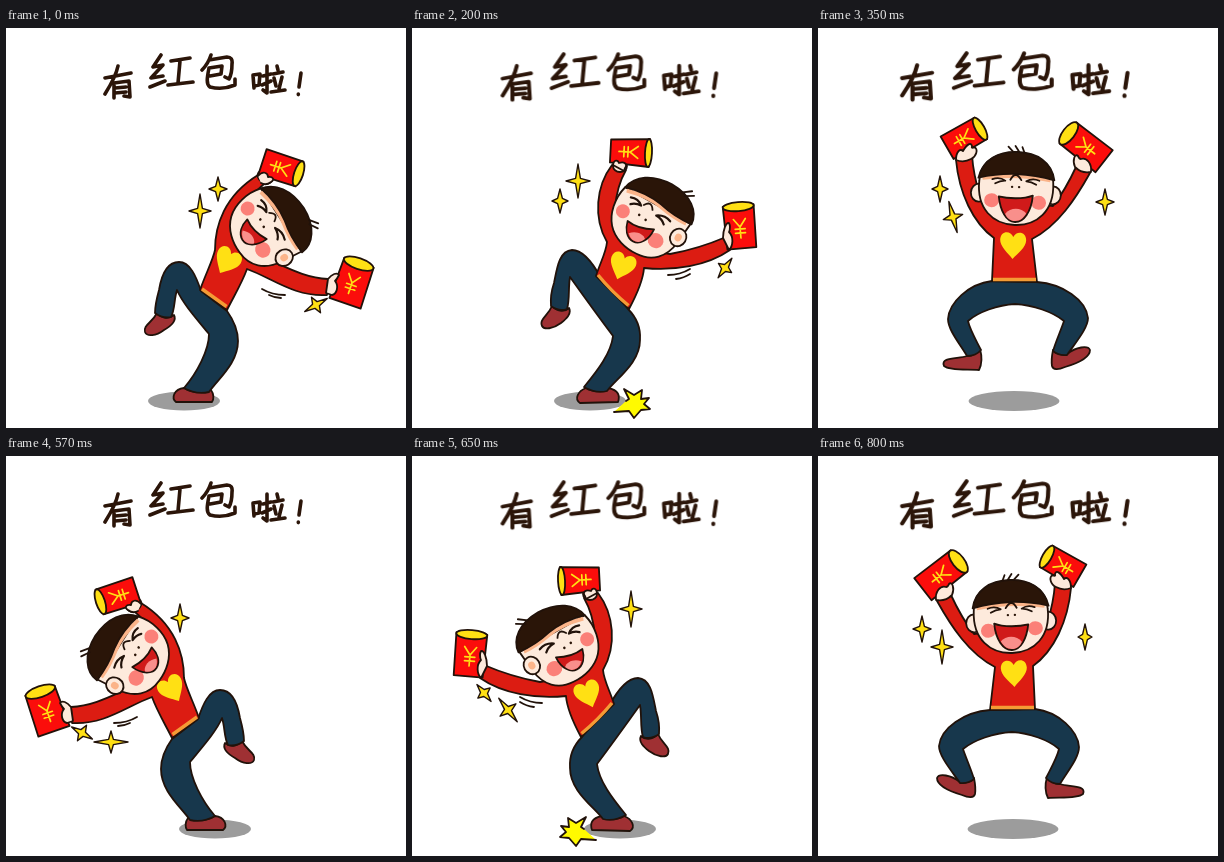
An HTML page that plays this animation: 400 px wide and 400 px high, repeating every 900 ms.

```html
<!DOCTYPE html>
<html lang="zh">
<head>
<meta charset="utf-8">
<title>有红包啦!</title>
<style>
  html, body { margin: 0; width: 100%; height: 100%; overflow: hidden; background: #fff; }
  svg { display: block; width: 100%; height: 100%; }
  .ink { stroke: #21120a; stroke-width: 1.8; stroke-linejoin: round; stroke-linecap: round; }
  .line { fill: none; }
  .eyes { fill: none; stroke-width: 2.2; }
  .pants { fill: #17374c; }
  .shoe { fill: #9f3033; }
  .shirt { fill: #dc1c12; }
  .skin { fill: #fdeadc; }
  .hair { fill: #2a1508; }
  .packet { fill: #fb0d0b; }
  .gold { fill: #ffe014; }
  .flash { fill: #fffa00; }
  .mouth { fill: #d01a1a; }
  .tongue { fill: #f98f8b; }
  .cheek { fill: #fb8078; }
  .blush { fill: none; stroke: #fbb489; stroke-width: 4; }
  .hem { stroke: #f49b35; stroke-width: 3.4; }
  .yen { fill: none; stroke: #ffe014; stroke-width: 1.7; stroke-linecap: round; }
  .star { stroke-width: 1.4; }
  .shadow { fill: #9c9c9c; }
  .words { fill: none; stroke: #2b1509; stroke-width: 3.6; stroke-linecap: round; stroke-linejoin: round;
    transform-origin: 198px 48px; animation: grow 450ms step-end infinite; }
  .lean, .kick, .jump { animation: lean 450ms step-end infinite; }
  .kick { animation-name: kick; }
  .jump { animation-name: jump; }
  .right, .left { animation: right 900ms step-end infinite; }
  .left { animation-name: left; }
  @keyframes lean { 0% { opacity: 1 } 44.4444%, 100% { opacity: 0 } }
  @keyframes kick { 0% { opacity: 0 } 44.4444% { opacity: 1 } 77.7778%, 100% { opacity: 0 } }
  @keyframes jump { 0% { opacity: 0 } 77.7778%, 100% { opacity: 1 } }
  @keyframes right { 0% { opacity: 1 } 50%, 100% { opacity: 0 } }
  @keyframes left { 0% { opacity: 0 } 50%, 100% { opacity: 1 } }
  @keyframes grow {
    0% { transform: none }
    44.4444% { transform: translate(.5px, .5px) scale(1.09, 1.06) }
    77.7778%, 100% { transform: scale(1.15, 1.08) }
  }
</style>
</head>
<body>
<svg id="stage" viewBox="0 0 400 400" role="img" aria-label="有红包啦!"></svg>
<script>
const path = (kind, d) => `<path class="${kind}" d="${d}"/>`;
const shape = (kind, d) => path('ink ' + kind, d);
const ellipse = (kind, x, y, rx, ry, turn = 0) =>
  `<ellipse class="${kind}" cx="${x}" cy="${y}" rx="${rx}" ry="${ry}" transform="rotate(${turn} ${x} ${y})"/>`;
const place = (x, y, turn, body) => `<g transform="translate(${x} ${y}) rotate(${turn})">${body}</g>`;

const packet = (x, y, turn, top, base, h, mouth = 4.5) => place(x, y, turn,
  shape('packet', `M${-top / 2},${-h / 2} H${top / 2} L${base / 2},${h / 2} H${-base / 2} Z`) +
  ellipse('ink gold', 0, -h / 2 + 1, top / 2, mouth) +
  path('yen', 'M-6,-8 L0,0 L6,-8 M0,0 V11 M-5,2 H5 M-5,6 H5'));

const heart = (x, y, turn) => place(x, y, turn,
  path('gold', 'M0,14 C-5,8 -13,2 -13,-5 C-13,-14 -3,-15 0,-8 C3,-15 13,-14 13,-5 C13,2 5,8 0,14Z'));

const star = ([x, y, h, w, turn = 0]) => place(x, y, turn,
  shape('gold star', `M0,${-h} L2.4,-2.6 L${w},0 L2.4,2.6 L0,${h} L-2.4,2.6 L${-w},0 L-2.4,-2.6Z`));

const frontHead =
  ellipse('ink skin', -37, 4, 8, 9) + ellipse('ink skin', 37, 4, 8, 9) +
  shape('skin', 'M-37,-8 C-37,-28 -20,-37 0,-37 C20,-37 37,-28 37,-8 C39,20 22,35 0,35 C-22,35 -39,20 -37,-8Z') +
  path('blush', 'M-34,-11 Q0,-17 34,-11') +
  shape('hair', 'M-38,-11 C-34,-30 -18,-38 0,-38 C20,-38 35,-29 38,-11 Q19,-16 0,-16 Q-19,-16 -38,-11Z') +
  shape('line', 'M-9,-43 l5,5 M-2,-44 l4,6 M5,-43 l2,5') +
  ellipse('cheek', -24, 11, 7.5, 7) + ellipse('cheek', 23, 12, 7.5, 7) +
  shape('line', 'M-24,-10 Q-17,-13 -11,-9 Q-16,-9 -21,-6 M23,-10 Q16,-13 10,-9 Q15,-9 20,-6 M-6,-10 Q-1,-20 5,-10') +
  ellipse('hair', -4, -3, 1.2, 1.2) + ellipse('hair', 3, -3, 1.2, 1.2) +
  shape('mouth', 'M-17,7 C-8,9 8,9 17,5 C16,21 9,32 0,32 C-9,32 -15,21 -17,7Z') +
  path('tongue', 'M-10,24 C-5,17 6,17 11,23 C8,29 4,31 0,31 C-4,31 -8,29 -10,24Z');

const turnedHead =
  shape('skin', 'M-35,-13 C-39,2 -35,18 -27,27 C-18,37 -4,40 8,39 C25,38 36,27 38,8 L40,-14Z') +
  path('blush', 'M-32,-11 Q-10,-17 6,-14 T36,-12') +
  shape('hair', 'M-35,-13 C-32,-28 -18,-38 4,-39 C26,-39 40,-28 41,-14 Q22,-12 5,-16 Q-14,-19 -35,-13Z') +
  shape('line', 'M17,-37 l8,-6 M21,-35 l8,-5') +
  ellipse('ink skin', 36, 4, 8, 9) + ellipse('blush', 36, 4, 1.5, 2) +
  ellipse('cheek', -25, 9, 7, 7) + ellipse('cheek', 18, 18, 8, 7.5) +
  shape('eyes', 'M-25,-7 Q-18,-10 -12,-5 Q-18,-5 -22,-1 M21,-6 Q13,-9 6,-4 Q13,-4 17,0') +
  shape('line', 'M-10,-7 Q-5,-15 0,-7') +
  ellipse('hair', -9, 4, 1.3, 1.3) + ellipse('hair', -1, 5, 1.3, 1.3) +
  shape('mouth', 'M-16,15 Q-3,17 11,9 C12,21 6,30 -1,30 C-9,30 -14,23 -16,15Z') +
  path('tongue', 'M-9,25 C-4,19 4,18 8,22 C6,27 3,29 -1,29 Q-5,29 -9,25Z');

const lean =
  ellipse('shadow', 178, 373, 36, 9.5) +
  shape('shoe', 'M151,285 C156,291 163,291 168,287 C171,293 165,298 158,302 C150,308 141,309 139,304 C137,297 146,295 151,285Z') +
  shape('shoe', 'M178,360 C186,365 198,365 205,362 C208,366 208,371 206,374 H170 C165,370 168,361 178,360Z') +
  shape('pants', 'M195,263 C190,248 184,234 173,234 C160,234 155,250 153,262 C150,273 149,279 149,285 Q157,291 165,289 C169,282 168,271 171,262 C176,274 188,288 203,306 C203,322 191,345 178,360 Q190,367 203,364 C213,350 232,335 232,313 C232,300 226,290 221,283Z') +
  shape('shirt', 'M194,262 C200,245 207,232 209,222 C209,198 218,168 252,147 L258,156 C250,163 243,170 238,178 L255,225 L268,234 C288,243 303,250 322,251 L321,267 C288,269 266,250 241,241 C236,255 228,268 221,282Z') +
  path('hem', 'M196,261 L220.5,278.5') +
  heart(221, 233, 30) +
  ellipse('ink skin', 259, 149, 8, 6, 35) +
  packet(275, 140, 108, 26, 27, 39) +
  shape('skin', 'M252,148 C257,142 262,145 262,149 C267,148 269,152 265,154 Q260,158 255,155') +
  packet(346, 255, 19, 31, 33, 43, 5.5) +
  shape('skin', 'M322,251 C326,246 331,244 333,247 Q331,251 329,253 C333,258 331,266 326,267 L320,265Z') +
  place(262.5, 197, 58, turnedHead) +
  shape('line', 'M256,261 Q266,267 279,267 M263,267 Q269,270 275,270');

const kick =
  ellipse('shadow', 178, 373, 36, 9.5) +
  shape('flash', 'M214,373 L217,371 L212,361 L222,367 L230,362 L229,371 L237,370 L232,376 L238,381 L229,382 L222,390 L217,383 L202,384') +
  shape('shoe', 'M140,278 C146,284 153,284 157,280 C160,286 154,291 149,295 C141,301 132,302 130,298 C127,291 136,288 140,278Z') +
  shape('shoe', 'M174,360 C180,364 190,364 196,360 C207,362 208,368 206,374 L168,375 C162,371 166,363 174,360Z') +
  shape('pants', 'M189,250 C182,237 172,222 160,222 C147,223 145,240 142,255 Q138,267 139,278 Q147,284 155,281 C158,272 156,260 158,249 C168,263 183,284 201,308 C199,325 186,342 172,359 Q184,366 195,363 C205,350 228,335 228,312 C229,298 223,288 216,281Z') +
  shape('shirt', 'M184,248 C188,235 194,225 195,214 C181,190 184,158 200,137 L214,142 C206,156 204,168 203,180 L235,222 L258,226 C280,222 300,215 314,209 L318,222 C295,238 262,243 232,240 C231,254 224,268 217,281Z') +
  path('hem', 'M186,247 Q200,264 216.5,277.5') +
  heart(210, 238, 20) +
  ellipse('ink skin', 208, 138, 7, 6) +
  packet(218, 124, 93, 28, 23, 39, 3.5) +
  shape('skin', 'M201,137 C202,131 206,132 207,135 C212,133 216,136 213,140 L212,143Z') +
  packet(328, 199, -5, 31, 29, 43) +
  shape('skin', 'M311,210 C311,202 314,194 317,195 Q319,199 317,204 C322,209 321,218 317,222Z') +
  place(237, 188, 30, turnedHead) +
  shape('line', 'M256,247 Q268,247 278,241 M264,251 Q272,250 278,246');

const jump =
  ellipse('shadow', 196, 373, 45.5, 10) +
  shape('shoe', 'M149,328 Q157,328 162,321 C164,328 164,336 161,342 C150,341 132,343 126,338 C122,329 140,331 149,328Z') +
  shape('shoe', 'M235,322 Q240,328 249,326 C258,319 270,317 272,322 C272,330 257,336 247,339 C240,342 235,342 234,338 C233,332 234,327 235,322Z') +
  shape('pants', 'M174,253 C150,256 131,275 130,291 C130,302 142,316 149,328 Q158,328 163,322 C158,312 152,302 150,293 C160,284 180,277 197,276 C215,277 235,284 246,293 C243,302 238,313 235,323 Q241,328 249,327 C258,314 270,300 270,290 C268,272 245,256 219,254Z') +
  shape('shirt', 'M174,253 L176,210 C155,195 141,165 138,132 L154,127 C155,142 158,155 162,168 L235,178 C245,165 252,152 258,139 L272,145 C258,170 240,198 214,211 L219,254Z') +
  path('hem', 'M175,251.5 H218') +
  heart(195, 217, 2) +
  packet(146, 110, 60, 25, 26, 39) +
  shape('skin', 'M138,132 C138,124 142,120 145,123 C149,116 153,114 154,118 Q153,121 156,119 C161,121 158,129 153,131 Q146,135 138,132Z') +
  packet(268, 119, -52, 27, 28, 46, 6) +
  shape('skin', 'M257,139 C254,132 257,125 260,128 Q261,131 263,131 C269,129 274,136 273,144 Q264,146 257,139Z') +
  place(198, 162, 2, frontHead);

const poses = { lean, kick, jump };
const mirrorSum = { lean: 387, kick: 386, jump: 391 };
// x, y, half height, half width, turn
const stars = {
  right: {
    lean: [[212, 161, 12, 9], [194, 183, 17, 11], [310, 277, 13, 9, 60]],
    kick: [[166, 153, 17, 12], [148, 173, 12, 8], [313, 240, 12, 8, 35]],
    jump: [[122, 161, 13, 8], [135, 189, 16, 10, -15], [287, 174, 13, 9]]
  },
  left: {
    lean: [[174, 162, 14, 9], [105, 286, 11, 17], [76, 277, 12, 9, -60]],
    kick: [[219, 153, 18, 11], [96, 254, 15, 10, -38], [72, 237, 11, 8, -40]],
    jump: [[104, 173, 13, 9], [124, 191, 17, 11], [267, 181, 13, 7]]
  }
};

const side = name => `<g class="${name}">` + Object.keys(poses).map(pose => {
  const flip = name === 'left' ? `translate(${mirrorSum[pose]} 0) scale(-1 1)` : '';
  return `<g class="${pose}"><g transform="${flip}">${poses[pose]}</g>${stars[name][pose].map(star).join('')}</g>`;
}).join('') + '</g>';

const lettering = [
  'M99,50 L125,45 M112,38 C110,48 104,58 99,66 M108,55 V70 M108,55 L123,53 L124,69 L118,68 M109,60 L120,59 M109,65 L120,64',
  'M155,27 L147,39 L157,37 L145,50 L157,48 M144,59 L159,53 M165,33 L184,30 M174,33 L172,55 M162,57 L187,54',
  'M205,27 Q202,36 196,42 M203,32 L221,29 Q227,29 226,36 Q226,46 223,51 L219,49 M203,40 L216,38 L215,46 L204,48 M203,40 C201,50 200,56 204,59 C212,61 222,60 229,57 V51',
  'M247,47 L248,60 M247,47 L254,46 L253,57 L248,58 M257,48 L265,46 M261,38 V65 L257,62 M256,57 L265,53 M271,38 L272,42 M267,46 L277,44 M268,50 L270,58 M276,49 L273,61 M265,64 L279,62',
  'M295,45 L293,59 M292.3,66 v.6'
];

document.getElementById('stage').innerHTML =
  `<g class="words">${lettering.map(d => `<path d="${d}"/>`).join('')}</g>` + side('right') + side('left');
</script>
</body>
</html>
```
